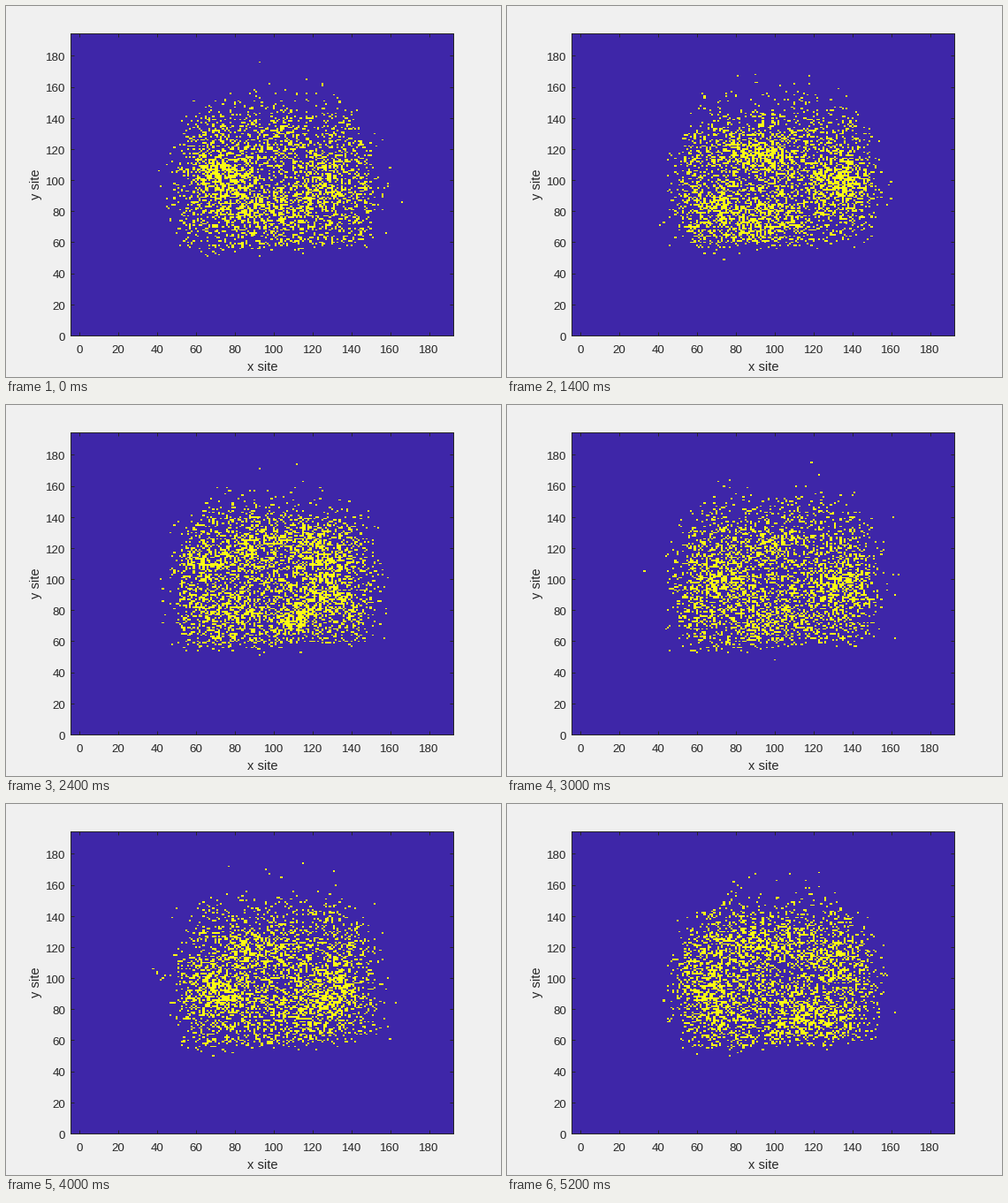
These frames come from a looping animation (560 by 420 pixels, 5.4 s). A matplotlib script:

```python
import numpy as np
import matplotlib.pyplot as plt
from matplotlib.animation import FuncAnimation
from matplotlib.colors import ListedColormap

W, H, DPI = 560, 420, 100
STEP = 200          # ms per tick of the animation
TICKS = 27
HOLD = 5            # ticks spent on the first shot
SHOTS = TICKS - HOLD + 1
PT = 72 / DPI       # points per pixel
INK = "#262626"
LEFT, RIGHT, TOP, BOTTOM = 73, 506, 31, 373
XLIM, YLIM = (-4.5, 192.5), (0, 194.5)

plt.rcParams["font.family"] = "Liberation Sans"

X, Y = np.meshgrid(np.arange(-4, 193), np.arange(0, 195))


def soft(d, width):
    """Smooth step from 0 to 1 around d = 0."""
    return 1 / (1 + np.exp(np.clip(-d / width, -50, 50)))


def bump(x, y, size):
    return np.exp(-((X - x) ** 2 + (Y - y) ** 2) / (2 * size ** 2))


def envelope(floor):
    """Cloud outline: sharp tilted floor, bulging sides, fading round top."""
    inset = (14 * (np.clip(Y - 90, 0, 80) / 58) ** 2
             + 7 * (np.clip(90 - Y, 0, 45) / 32) ** 2)
    sides = soft(X - 49.5 - inset, 2.8) * soft(152 - inset - X, 2.8)
    base = soft(Y - floor - 0.06 * (X - 100), 1.6)
    return sides * base * soft(143 - Y, 6.2)


def shot(n):
    """One random filling of the sites, denser at spots around a ring."""
    rng = np.random.default_rng(400 + n)
    angles = np.arange(7) * 2 * np.pi / 7 + rng.uniform(0, 0.9, 7)
    reach = rng.uniform(0.6, 1, 7)
    density = 1
    for a, r in zip(angles, reach):
        density = density + 0.85 * bump(100 + 38 * r * np.cos(a),
                                        98 + 32 * r * np.sin(a), 9)
    chance = rng.uniform(0.25, 0.29) * density
    return rng.random(X.shape) < chance * envelope(rng.uniform(56.5, 59.5))


shots = [shot(n) for n in range(SHOTS)]

fig = plt.figure(figsize=(W / DPI, H / DPI), dpi=DPI, facecolor="#f0f0f0")
ax = fig.add_axes([LEFT / W, 1 - BOTTOM / H, (RIGHT - LEFT) / W,
                   (BOTTOM - TOP) / H], facecolor="#3e26a8")
image = ax.imshow(shots[0], cmap=ListedColormap(["#3e26a8", "#f9fb15"]),
                  vmin=0, vmax=1, origin="lower", aspect="auto",
                  interpolation="nearest", extent=(-4.5, 192.5, -0.5, 194.5))
ax.set(xlim=XLIM, ylim=YLIM)
marks = range(0, 181, 20)
ax.set_xticks(marks)
ax.set_yticks(marks)
ax.tick_params(direction="in", top=True, right=True, length=4.3 * PT,
               width=PT, color=INK, labelbottom=False, labelleft=False)
for spine in ax.spines.values():
    spine.set(color=INK, linewidth=PT)


def label(x, y, text, size, ha="center", **style):
    """Text with its baseline at a pixel position counted from the top."""
    fig.text(x / W, 1 - y / H, text, fontsize=size * PT, color=INK,
             ha=ha, va="baseline", **style)


for v in marks:
    px = LEFT + (v - XLIM[0]) / (XLIM[1] - XLIM[0]) * (RIGHT - LEFT)
    py = BOTTOM - v / YLIM[1] * (BOTTOM - TOP)
    label(px, 393, str(v), 13.33)
    label(67, py + 5.75, str(v), 13.33, ha="right")
label(290, 413, "x site", 14.67)
label(38, 202, "y site", 14.67, rotation=90, rotation_mode="anchor")


def update(tick):
    image.set_data(shots[max(0, tick - HOLD + 1)])
    return [image]


anim = FuncAnimation(fig, update, frames=TICKS, interval=STEP, repeat=True,
                     repeat_delay=0, blit=False)
plt.show()
```
